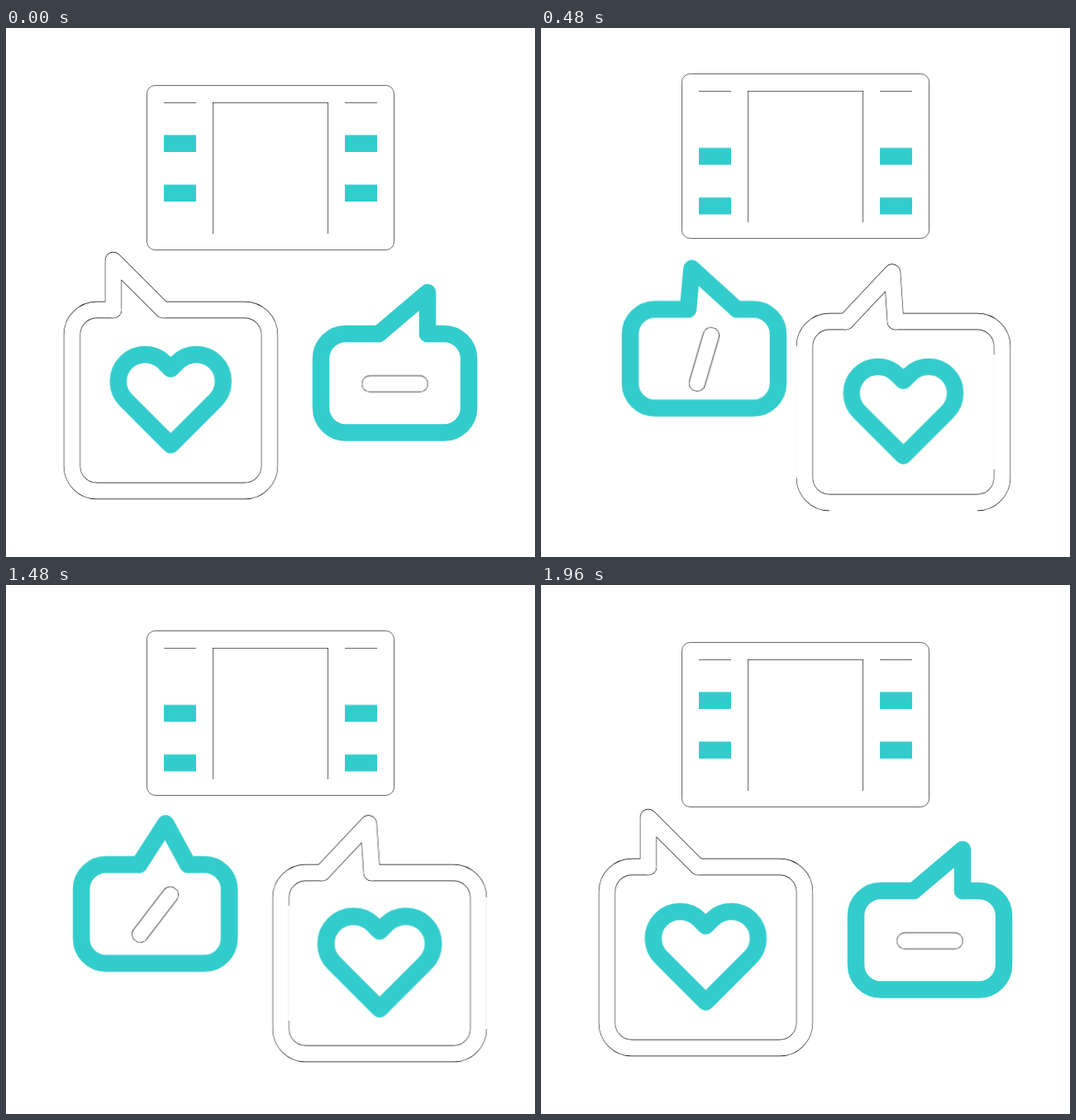
Animation, 640 px wide and 640 px high, one loop 2000 ms. Source, as an HTML page without scripts:

```html
<!DOCTYPE html>
<html lang="en">
<head>
<meta charset="utf-8">
<title>Video and reactions</title>
<style>
  html, body { margin: 0; width: 100%; height: 100%; overflow: hidden; background: #fff; }
  svg { display: block; width: 100%; height: 100%; }

  .teal { fill: #3cc; }
  .thick, .edge, .body { fill: none; stroke-linejoin: round; stroke-linecap: round; }
  .thick { stroke: #3cc; stroke-width: 20.5; }
  .edge { fill: #fff; stroke: #000; stroke-width: 20.3; }
  .body { stroke: #fff; stroke-width: 19.2; }
  .hair { fill: none; stroke: #000; stroke-width: .6; }
  .gap { fill: none; stroke: #fff; stroke-width: 3; opacity: 0; }

  .move { animation: 2s cubic-bezier(.36, 0, .64, 1) infinite; }
  .flip { animation: 2s steps(1) infinite; }

  .film { animation-name: film; }
  .holes { animation-name: holes; }
  .rails { animation-name: rails; }
  .stick { animation-name: stick; animation-timing-function: cubic-bezier(.25, .15, .75, .85); }
  .heart { animation-name: heart; }
  .out { animation-name: out; }
  .back { animation-name: back; }
  .like { d: path("M130 341L130 281L190 341"); animation-name: like; }
  .note { d: path("M451 370L510 320L510 370"); animation-name: note; }

  @keyframes film {
    0%, 2%, 40%, 58%, 98%, to { transform: translateY(0); }
    16%, 82% { transform: translateY(23px); }
    24%, 74% { transform: translateY(-14px); }
  }
  @keyframes holes {
    0%, 2%, 40%, 58%, 98%, to { transform: translateY(0); }
    16%, 82% { transform: translateY(-28.5px); }
    24%, 74% { transform: translateY(29.5px); }
  }
  @keyframes rails {
    0%, 20%, 90%, to { transform: translateY(0); }
    8%, 78% { transform: translateY(158px); }
  }
  @keyframes stick {
    0%, 2% { transform: rotate(0deg); }
    40%, 48% { transform: rotate(180deg); }
    86%, to { transform: rotate(360deg); }
  }
  @keyframes heart {
    0%, 16%, 40%, 58%, 82%, to { transform: scale(1); }
    24% { transform: scale(.987); }
    74% { transform: scale(1.022); }
  }
  @keyframes like {
    16%, 82% { d: path("M130 341L186 281.5L190 341"); }
    0%, 2%, 98%, to { d: path("M130 341L130 281L190 341"); }
  }
  @keyframes note {
    16%, 66% { d: path("M451 370L455.5 320.5L510 370"); }
    0%, 2%, 82%, to { d: path("M451 370L510 320L510 370"); }
  }
  @keyframes out { 0%, 31%, to { opacity: 0; } 4% { opacity: 1; } }
  @keyframes back { 0%, 95%, to { opacity: 0; } 71% { opacity: 1; } }
</style>
</head>
<body>
<svg viewBox="0 0 640 640">
  <defs>
    <clipPath id="window"><rect x="180" y="90" width="280" height="159"/></clipPath>
    <path id="hole" d="M191 0h39v20.5h-39zM410 0h39v20.5h-39z"/>
    <path id="box" d="M190 341H289a30 30 0 0 1 30 30V530a30 30 0 0 1-30 30H110a30 30 0 0 1-30-30V371a30 30 0 0 1 30-30H130"/>
    <path id="dash" d="M-30 0H30"/>
  </defs>

  <g class="move film">
    <rect class="hair" x="170.5" y="69.5" width="299" height="199" rx="10"/>
    <g clip-path="url(#window)">
      <g class="teal move holes">
        <use href="#hole" y="129.5"/>
        <use href="#hole" y="189.5"/>
        <use href="#hole" y="258"/>
      </g>
    </g>
    <path class="hair" d="M250.5 90V249M389.5 90V249"/>
    <path class="hair flip rails" d="M191 90.5h39M250 90.5h140M410 90.5h39"/>
  </g>

  <!-- comment bubble -->
  <g>
    <animateMotion path="M0 0C-100-28-200-18-298.5-33" dur="2s" repeatCount="indefinite" calcMode="spline"
      keyPoints="0;0;1;1;0;0" keyTimes="0;.02;.316;.7;.954;1"
      keySplines="0 0 1 1;.6 0 .4 1;0 0 1 1;.6 0 .4 1;0 0 1 1"/>
    <path class="thick" d="M510 370H530a30 30 0 0 1 30 30V459.5a30 30 0 0 1-30 30H411a30 30 0 0 1-30-30V400a30 30 0 0 1 30-30H451"/>
    <path class="thick move note"/>
    <g transform="translate(470.5 430.5)">
      <g class="move stick">
        <use href="#dash" class="edge"/>
        <use href="#dash" class="body"/>
      </g>
    </g>
  </g>

  <!-- like bubble -->
  <g>
    <animateMotion path="M-.2 0C54 17 117 39 158 39.8C194 40 224 21 259.7 3.5" dur="2s" repeatCount="indefinite" calcMode="spline"
      keyPoints="0;0;1;1;0;0" keyTimes="0;.02;.316;.7;.954;1"
      keySplines="0 0 1 1;.6 0 .4 1;0 0 1 1;.6 0 .4 1;0 0 1 1"/>
    <use href="#box" class="edge"/>
    <path class="edge move like"/>
    <use href="#box" class="body"/>
    <path class="body move like"/>
    <!-- hairlines drop out on some sides while moving -->
    <path class="gap flip out" d="M70 371V530M110 570H289M309 381V520"/>
    <path class="gap flip back" d="M329 371V530M90 381V520"/>
    <g transform="translate(199.5 450)">
      <path class="thick move heart" d="M0-37.5L-8-45.5A32.5 32.5 0 1 0-54 .5L0 54.5L54 .5A32.5 32.5 0 1 0 8-45.5z"/>
    </g>
  </g>
</svg>
</body>
</html>
```
